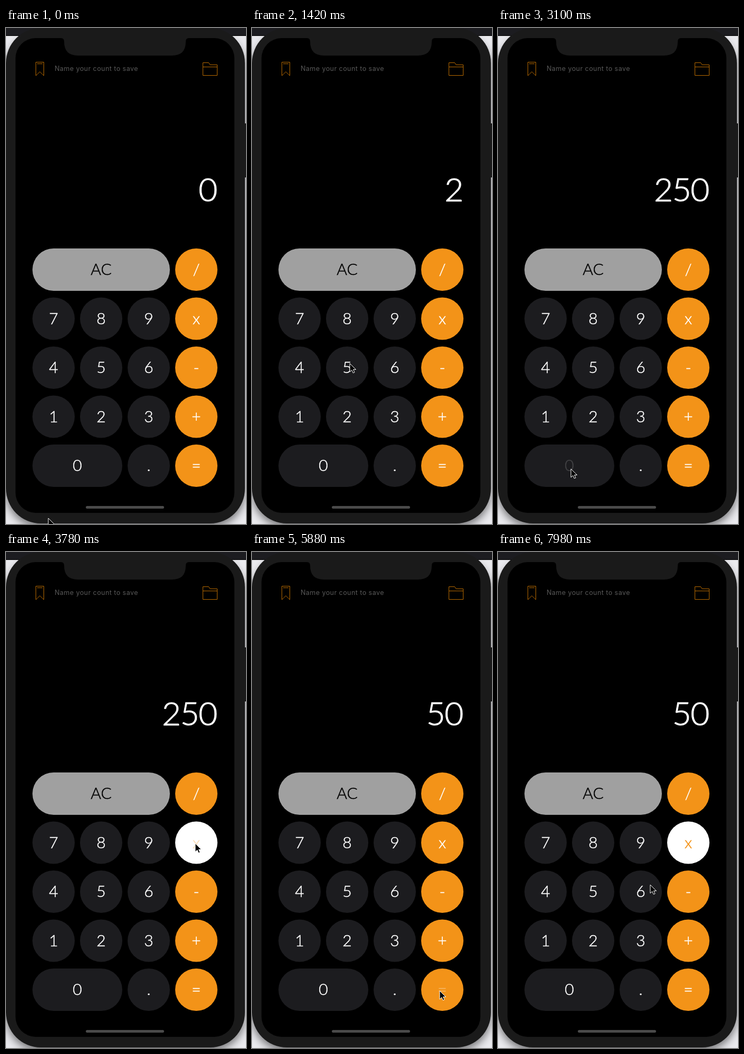
Recreate the animation shown at these times as an HTML page. Size 454 px wide and 936 px high, loop 8 s.

```html
<!DOCTYPE html>
<html lang="en">
<head>
<meta charset="utf-8">
<title>Calculator</title>
<style>
  html, body { margin: 0; width: 100%; height: 100%; overflow: hidden; background: #000; }
  svg { display: block; width: 100vw; height: 100vh; }
  .body { fill: #1a1a1a; }
  .icon { fill: none; stroke: #b86a00; }
  .hint { font: 12.5px Inter, sans-serif; letter-spacing: .45px; fill: #585858; }
  .display, .key text { fill: currentColor; stroke: currentColor; stroke-width: .018em; }
  .display { font: 300 62px Lato, sans-serif; letter-spacing: -1.3px; color: #fff; text-anchor: end; }
  .key text { font: 300 30px Lato, sans-serif; color: #fff; text-anchor: middle; }
  .key rect { fill: #1c1c1f; }
  .op rect { fill: #f39318; }
  .clear rect { fill: #a0a0a0; }
  .clear text { color: #000; }
</style>
</head>
<body>
<svg viewBox="0 0 454 936" preserveAspectRatio="none">
  <defs>
    <filter id="blur"><feGaussianBlur stdDeviation="8"/></filter>
  </defs>

  <rect width="454" height="936" fill="#eaeaee"/>
  <rect y="12" width="452" height="930" rx="66" opacity=".5" filter="url(#blur)"/>
  <rect width="454" height="14" fill="#1c1c20"/>
  <path d="M0 14.5H454" stroke="#000"/>
  <rect class="body" x="449" y="180" width="5" height="102"/>
  <rect class="body" width="452" height="935" rx="66"/>
  <rect x="18" y="19" width="414" height="896" rx="38"/>
  <path class="body" d="M104 18V19Q110 19 110 26Q110 52 136 52H314Q340 52 340 26Q340 19 346 19V18Z"/>

  <path class="icon" d="M56.5 64.5H71.5V90L64 82.5L56.5 90ZM59 67.5H69"/>
  <path class="icon" d="M372.5 89.5V65.5H383.5L386 69.5H399.5V89.5ZM372.5 73.5H399.5"/>
  <text class="hint" x="92" y="81">Name your count to save</text>
  <text class="display" id="display" x="399" y="327">0</text>
  <g id="keys"></g>
  <rect x="151" y="902" width="148" height="5" rx="2.5" fill="#4a4a4a"/>
  <path id="cursor" d="M0 0V16L3.8 12.5L6.3 18L9 16.8L6.6 11.5H11.5Z" fill="#000" stroke="#fff"/>
</svg>

<script>
const LOOP = 8000;
const keys = {};

function addKey(label, column, row, span = 1, kind = '') {
  const x = 50 + column * 90, y = 416 + row * 92.5, width = span * 90 - 10;
  const group = document.createElementNS('http://www.w3.org/2000/svg', 'g');
  group.setAttribute('class', `key ${kind}`);
  group.innerHTML = `<rect x="${x}" y="${y}" width="${width}" height="80" rx="40"/>
    <text x="${x + width / 2}" y="${y + 50}">${label}</text>`;
  document.getElementById('keys').append(group);
  keys[label] = { face: group.querySelector('rect'), text: group.querySelector('text') };
}

addKey('AC', 0, 0, 3, 'clear');
['789', '456', '123'].forEach((row, r) =>
  [...row].forEach((digit, c) => addKey(digit, c, r + 1)));
addKey('0', 0, 4, 2);
addKey('.', 2, 4);
[...'/x-+='].forEach((sign, r) => addKey(sign, 3, r, 1, 'op'));

// time, key, resulting display
const presses = [
  [920, '2', '2'], [1640, '5', '25'], [2960, '0', '250'], [3620, 'x', '250'],
  [4600, '.', '0'], [5220, '2', '0.2'], [5720, '=', '50'], [6880, 'x', '50']
];

// time, x, y of the pointer tip
const path = [
  [0, 80, 925], [180, 80, 925], [800, 178, 738], [1080, 178, 738],
  [1420, 185, 633], [1560, 183, 640], [1900, 183, 640], [2360, 180, 610],
  [2840, 138, 832], [3120, 138, 832], [3560, 358, 550], [3900, 358, 550],
  [4500, 267, 831], [4780, 267, 831], [5120, 180, 738], [5300, 180, 738],
  [5660, 355, 828], [6100, 355, 828], [6720, 358, 552], [7200, 358, 552],
  [7900, 288, 628], [8000, 288, 628]
];

const clamp = v => Math.max(0, Math.min(1, v));
const mix = (a, b, k) => a + (b - a) * k;
const blend = (a, b, k) => `rgb(${a.map((v, i) => Math.round(mix(v, b[i], k)))})`;

function pointerAt(t) {
  const i = path.findIndex(p => p[0] > t);
  const [t0, x0, y0] = path[i - 1], [t1, x1, y1] = path[i];
  const k = (t - t0) / (t1 - t0), eased = k * k * (3 - 2 * k);
  return [mix(x0, x1, eased), mix(y0, y1, eased)];
}

function labelOpacity(age) {
  if (age < 0 || age > 250) return 1;
  return age < 120 ? 1 - clamp(age / 60) : clamp((age - 120) / 130);
}

const display = document.getElementById('display');
const cursor = document.getElementById('cursor');

function render(t) {
  let shown = '0', active = '';
  for (const key of Object.values(keys)) key.opacity = 1;
  for (const [time, label, value] of presses) {
    if (t >= time) [shown, active] = [value, label];
    keys[label].opacity = Math.min(keys[label].opacity, labelOpacity(t - time));
  }
  for (const { text, opacity } of Object.values(keys)) text.setAttribute('opacity', opacity);
  if (display.textContent !== shown) display.textContent = shown;

  const selected = clamp((t - 3620) / 100) - clamp((t - 4600) / 150) + clamp((t - 6880) / 100);
  keys.x.face.style.fill = blend([243, 147, 24], [255, 255, 255], selected);
  keys.x.text.style.color = active === 'x' ? '#f39318' : '#fff';

  const [x, y] = pointerAt(t);
  cursor.setAttribute('transform', `translate(${x.toFixed(1)} ${y.toFixed(1)})`);
}

const start = performance.now();
function tick() {
  render((performance.now() - start) % LOOP);
  requestAnimationFrame(tick);
}
tick();
</script>
</body>
</html>
```
